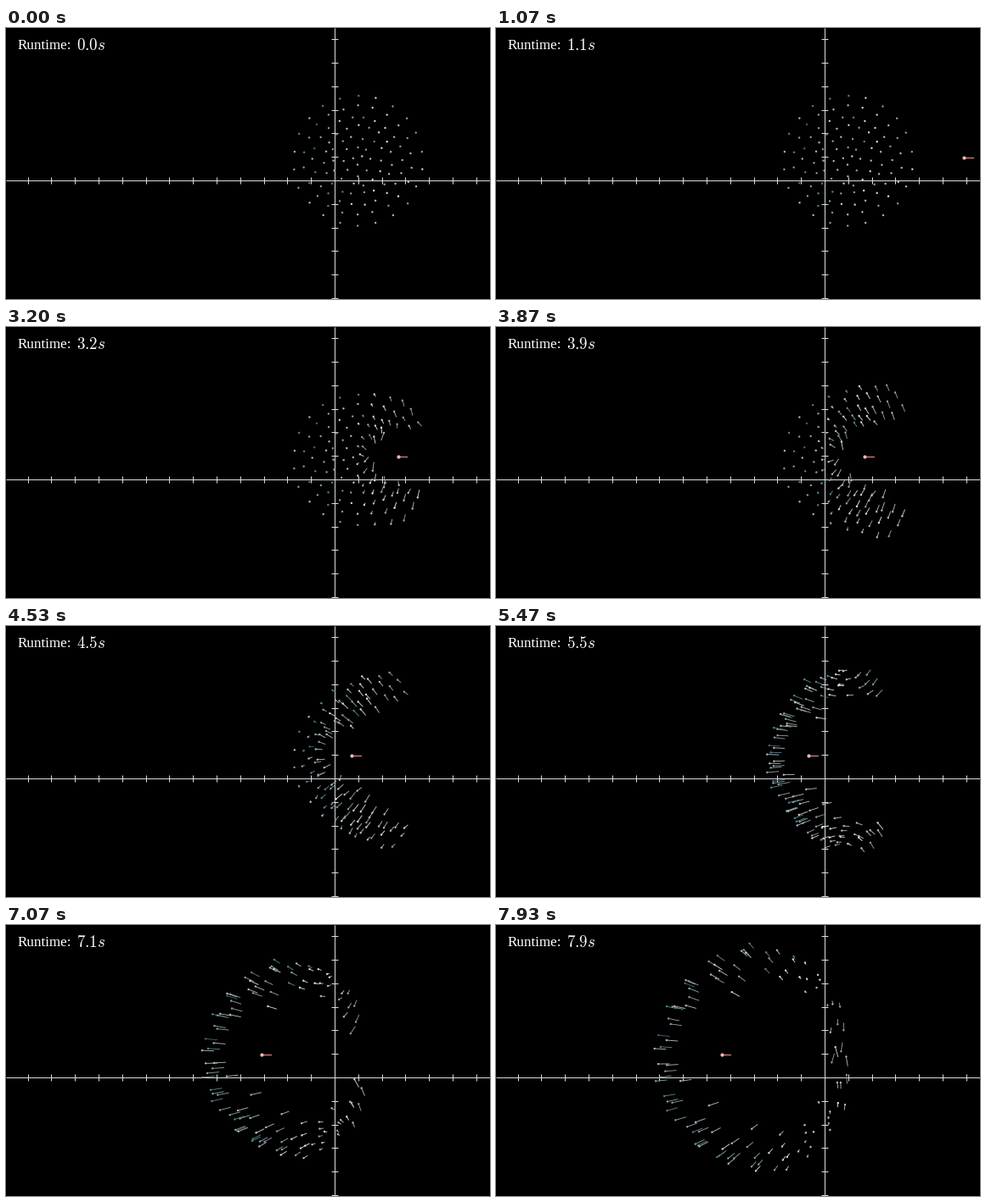
A matplotlib script that plays this animation: 570x320 px, repeating every 8 s.

```python
import numpy as np
import matplotlib.pyplot as plt
from matplotlib.animation import FuncAnimation
from matplotlib.collections import LineCollection

W, H, DPI = 570, 320, 100
PX = 72 / DPI
FRAMES, STEP = 160, 50
ORIGIN, UNIT = (387, 180), 27.8
CENTRE = (414.5, 156.5)    # middle of the resting flock
HUNT_Y, SPEED = 152.5, 41.7
TAIL = 0.26                # seconds of motion shown behind each dot

plt.rcParams["mathtext.fontset"] = "cm"
rng = np.random.default_rng(7)


def hunter_x(t):
    return 595.8 - SPEED * t


def rest_flock():
    """Seven rings, tight and uneven inside, regular at the rim."""
    pts = []
    for k in range(7):
        n = min(22, round(3 + 5.4 * k))
        stagger = 0.5 if k in (0, 2, 4) else 0
        a = np.pi / 2 + 2 * np.pi * (np.arange(n) + stagger) / n
        r = 6.5 + 11 * k + 0.1 * k * k
        ring = np.stack([CENTRE[0] + r * np.cos(a), CENTRE[1] - r * np.sin(a)], 1)
        pts.append(ring + rng.normal(0, 1.8 - 0.2 * k, (n, 2)))
    return np.concatenate(pts)


rest = rest_flock()
scatter = rng.normal(0, 3.2, rest.shape)


def ring_pose(cx, inner, width, turn, curl):
    """Slit the flock along the hunter's path and bend it into a ring.

    The square root opens the slit: its real part runs along the arms,
    its imaginary part from the inner edge to the outer one.
    """
    z = (rest[:, 0] - 400 + 1j * (HUNT_Y - rest[:, 1])) / 90
    w = np.sqrt(z)
    a = np.radians(turn * w.real + curl * w.real**3)
    r = inner + width * np.abs(w.imag) ** 0.4
    x = cx - r * np.cos(a)
    y = CENTRE[1] - np.sign(w.imag) * 1.12 * r * np.sin(a)
    return np.stack([x, y], 1) + scatter


# The alarm runs through the flock from right to left.
alarm = (1.75 + (488 - rest[:, :1]) / 56.6)
T1, T2, T3 = 5.47, 7.07, 7.93
crescent = ring_pose(425, 55, 52, 85, 25)
horseshoe = ring_pose(341, 54, 58, 120, 40)
closed = ring_pose(312, 68, 60, 125, 60)
v1 = (horseshoe - crescent) / (T2 - T1)
v2 = (closed - crescent) / (T3 - T1)
v3 = (closed - horseshoe) / (T3 - T2)


def hermite(u, h, p, q, a, b):
    return (p * (2 * u**3 - 3 * u**2 + 1) + q * (3 * u**2 - 2 * u**3)
            + h * (a * (u**3 - 2 * u**2 + u) + b * (u**3 - u**2)))


def flock_at(t):
    if t < T1:
        h = T1 - alarm
        u = np.clip((t - alarm) / h, 0, 1)
        pos = hermite(u, h, rest, crescent, 0, v1)
    elif t < T2:
        pos = hermite((t - T1) / (T2 - T1), T2 - T1, crescent, horseshoe, v1, v2)
    elif t < T3:
        pos = hermite((t - T2) / (T3 - T2), T3 - T2, horseshoe, closed, v2, v3)
    else:
        pos = closed + v3 * (t - T3)
    # Close ones are pushed straight away from the hunter.
    away = pos - [hunter_x(t), HUNT_Y]
    d = np.hypot(*away.T)[:, None] + 1e-6
    return pos + away / d * 0.4 * np.maximum(0, 48 - d)


def velocity_at(t, e=0.04):
    return (flock_at(t + e) - flock_at(t - e)) / (2 * e)


fig = plt.figure(figsize=(W / DPI, H / DPI), dpi=DPI, facecolor="black")
ax = fig.add_axes([0, 0, 1, 1])
ax.set_xlim(0, W)
ax.set_ylim(H, 0)
ax.axis("off")

# Coordinate cross with unit ticks
ox, oy = ORIGIN
grid = [[(0, oy), (W, oy)], [(ox, 0), (ox, H)]]
for i in range(-13, 7):
    x = ox + i * UNIT
    grid.append([(x, oy - 4), (x, oy + 4)])
for i in range(-6, 6):
    y = oy + i * UNIT
    grid.append([(ox - 4, y), (ox + 4, y)])
ax.add_collection(LineCollection(grid, colors="#dcdcdc", linewidths=PX))

# Flock: paler towards the right side
shades = np.array(["#3b6478", "#56808f", "#8a9c9e", "#b0b8b5", "#d0d3cc", "#e6e6e0"])
tone = (rest[:, 0] - 338) / 153 * 2.4 + rng.uniform(0, 3.6, len(rest))
colors = shades[np.clip(tone, 0, 5).astype(int)]
tails = LineCollection([], colors=colors, linewidths=0.9 * PX, zorder=3)
ax.add_collection(tails)
dots = ax.scatter(*rest.T, s=(2.4 * PX) ** 2, c=colors, linewidths=0, zorder=4)

# Hunter
hunt_tail, = ax.plot([], [], color="#e09090", lw=1.1 * PX, zorder=5)
hunt_dot = ax.scatter([0], [0], s=(4.2 * PX) ** 2, c="#f4b4b4", linewidths=0, zorder=6)

ax.text(13.5, 25.3, "Runtime:", color="white", family="Liberation Serif",
        size=17 * PX, va="baseline")
clock = ax.text(83.3, 25.8, "", color="white", size=19 * PX, va="baseline")


def draw(i):
    t = i * STEP / 1000 + (0.02 if i else 0)
    pos = flock_at(t)
    dots.set_offsets(pos)
    tails.set_segments(np.stack([pos, pos - velocity_at(t) * TAIL], 1))
    x = hunter_x(t)
    hunt_dot.set_offsets([(x, HUNT_Y)])
    hunt_tail.set_data([x, x + SPEED * TAIL], [HUNT_Y, HUNT_Y])
    clock.set_text(f"${t:.1f}s$")
    return tails, dots, hunt_tail, hunt_dot, clock


anim = FuncAnimation(fig, draw, frames=FRAMES, interval=STEP, repeat=True,
                     repeat_delay=0, blit=False)
plt.show()
```
